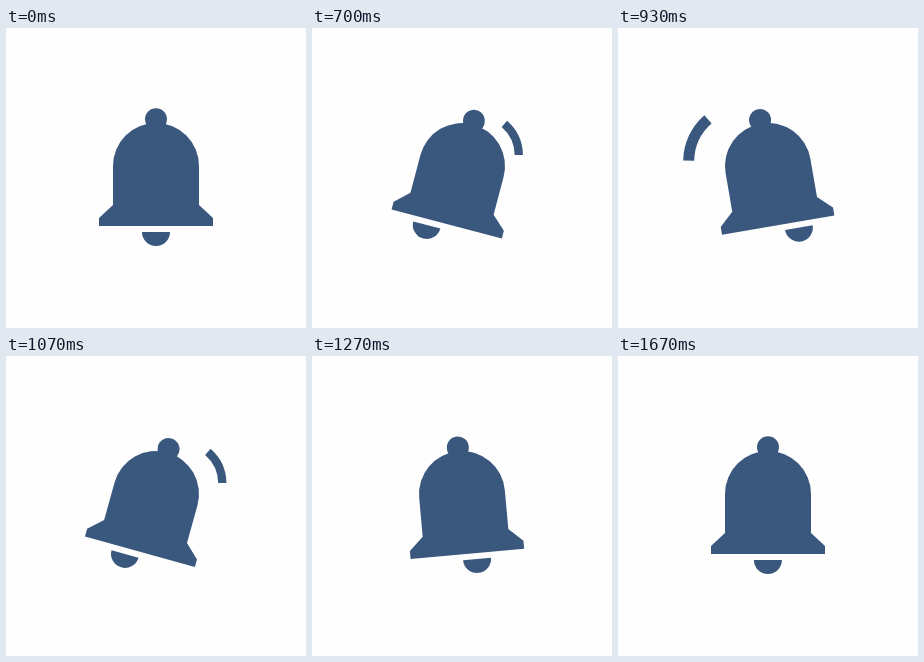
Write an HTML page that moves like this. It is 300 px wide and 300 px high and loops after 2010 ms.

```html
<!DOCTYPE html>
<html lang="en">
<head>
<meta charset="utf-8">
<title>Ringing bell</title>
<style>
  html, body { margin: 0; width: 100%; height: 100%; overflow: hidden; background: #fefefe; }
  svg { display: block; width: 100%; height: 100%; fill: #3a587d; }
  .wave { fill: none; stroke: #3a587d; stroke-width: 11; }
</style>
</head>
<body>
<svg viewBox="0 0 300 300">
  <defs>
    <path id="arc" class="wave" d="M8.7 22.6A56 56 0 0 0 -10.6 -18.7"/>
  </defs>
  <!-- bell drawn around its pivot -->
  <g id="bell">
    <circle cy="-46.7" r="11"/>
    <path d="M-43 0A43 43 0 0 1 43 0V39L57 52V60H-57V52L-43 39Z"/>
    <path id="clapper" d="M-14 66H14A14 14 0 0 1 -14 66Z"/>
  </g>
  <use id="right" href="#arc"/>
  <use id="left" href="#arc"/>
</svg>
<script>
  const LOOP = 2010, STEP = 100 / 3, LAST = 59;
  const PIVOT = { x: 150, y: 138 }, WAVE_Y = 110, REACH = 75;
  const $ = id => document.getElementById(id);
  const bell = $('bell'), clapper = $('clapper');

  // Times are in frames, 30 per second. Each motion eases from peak to peak on a steady beat.
  const BEAT = 5.92, LEAD = 7.7;
  const swing = { first: 20.4, peaks: [15.7, -16, 15.7, -5.2, 5] };
  const slide = { first: 20.9, peaks: [-19, 24, -15.5, 10, -5] };

  const waves = [
    { el: $('right'), side: 1, pulses: [{ start: 19.5, end: 28, from: 45 }, { start: 30.5, end: 38, from: 56 }] },
    { el: $('left'), side: -1, pulses: [{ start: 22.7, end: 30.2, from: 60 }, { start: 32.2, end: 38, from: 60 }] }
  ];

  const clamp = p => Math.min(1, Math.max(0, p));
  const smooth = p => p * p * (3 - 2 * p);
  const popIn = p => 1 - (1 - p) ** 2;
  const mix = (a, b, p) => a + (b - a) * p;

  function sway({ first, peaks }, f) {
    if (f < first) return peaks[0] * smooth(clamp(1 - (first - f) / LEAD));
    const beats = (f - first) / BEAT, i = Math.floor(beats);
    return mix(peaks[i] || 0, peaks[i + 1] || 0, smooth(beats - i));
  }

  function drawWave({ el, side, pulses }, f) {
    const pulse = pulses.find(p => f > p.start && f < p.end);
    el.style.display = pulse ? '' : 'none';
    if (!pulse) return;
    const { start, end, from } = pulse;
    const x = PIVOT.x + side * mix(from, REACH, (f - start) / (end - start));
    const size = Math.min(popIn(clamp((f - start) / 3)), end - f);
    el.setAttribute('transform', `translate(${x} ${WAVE_Y}) scale(${side * size} ${size})`);
  }

  function draw(ms) {
    const f = Math.min(LAST, Math.floor((ms % LOOP + 3.4) / STEP));
    bell.setAttribute('transform', `translate(${PIVOT.x} ${PIVOT.y}) rotate(${sway(swing, f)})`);
    clapper.setAttribute('transform', `translate(${sway(slide, f)} 0)`);
    waves.forEach(w => drawWave(w, f));
  }

  const start = performance.now();
  function tick() {
    draw(performance.now() - start);
    requestAnimationFrame(tick);
  }
  tick();
</script>
</body>
</html>
```
